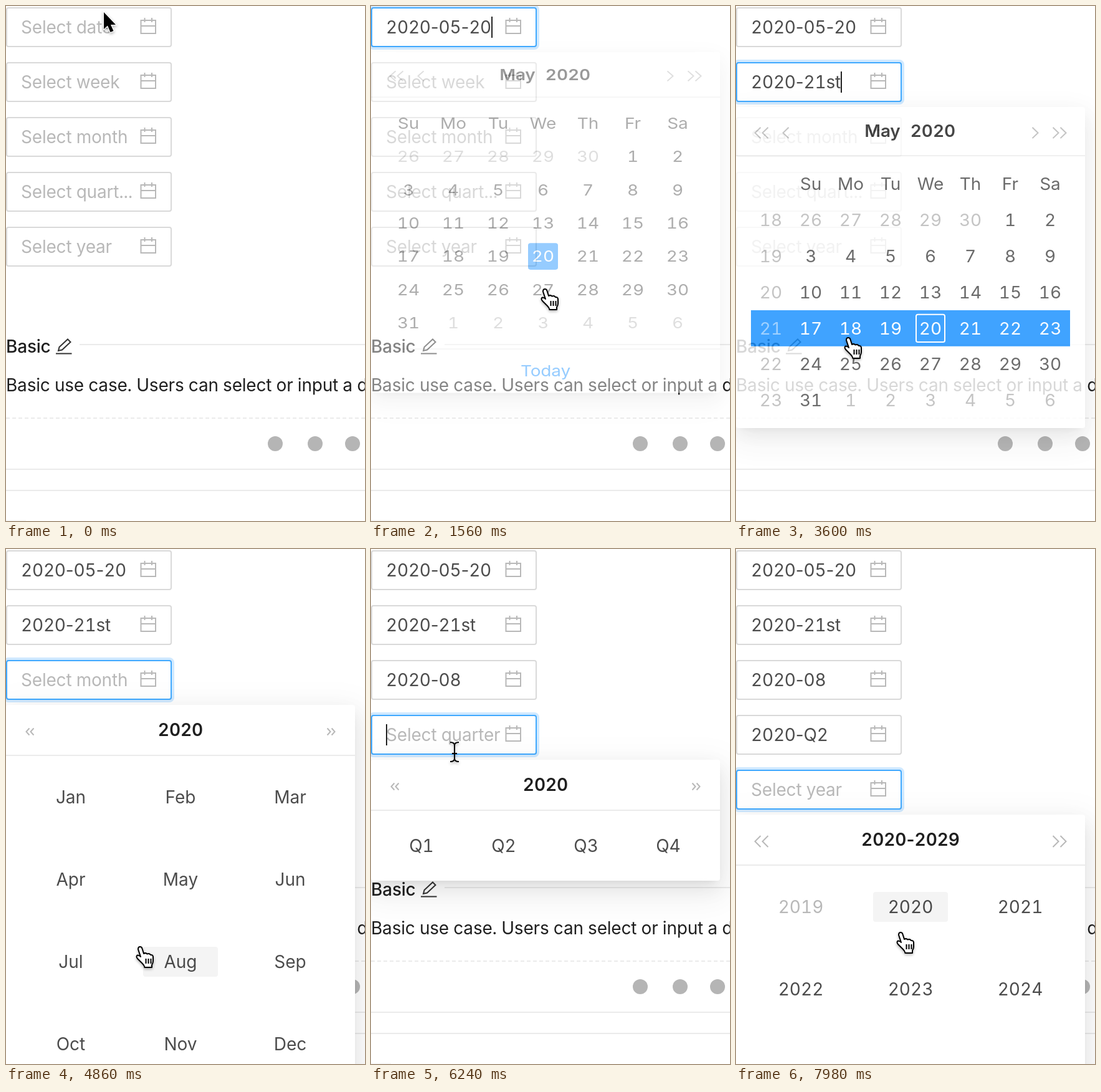
These frames come from a looping animation (576 by 826 pixels, 8000 ms). An HTML page:

```html
<!DOCTYPE html>
<html lang="en">
<head>
<meta charset="utf-8">
<title>Date pickers</title>
<style>
  html, body { margin: 0; width: 100%; height: 100%; overflow: hidden; background: #fff; }
  #stage { position: relative; width: 576px; height: 826px; overflow: hidden; }
  svg { position: absolute; left: 0; top: 0; overflow: visible; }
  text { font: 28px Inter, Roboto, sans-serif; font-feature-settings: "tnum"; fill: #000; fill-opacity: .7; }
  .hyphen { font-feature-settings: normal; }
  .word, .value { letter-spacing: -.2px; }
  .hint { fill-opacity: .28; }
  .dark { fill-opacity: .88; }
  .title { font-weight: 600; fill-opacity: .88; }
  .panel {
    position: absolute; left: 0; width: 560px; background: #fff; border-radius: 4px; transform-origin: 0 0;
    box-shadow: 0 6px 12px -8px rgba(0,0,0,.12), 0 12px 32px rgba(0,0,0,.08), 0 18px 56px 16px rgba(0,0,0,.05);
  }
  .panel text { text-anchor: middle; }
  .line { fill: none; stroke-width: 2; }
</style>
</head>
<body>
<div id="stage"></div>
<script>
const LOOP = 8000, STEP = 60, FADE = 200;
const BLUE = '#1890ff', RULE = '#ebebeb', ICON = '#b8b8b8';
const stage = document.getElementById('stage');

function el(tag, attrs, parent, content) {
  const node = document.createElementNS('http://www.w3.org/2000/svg', tag);
  set(node, attrs);
  if (content !== undefined) node.textContent = content;
  return parent.appendChild(node);
}
function set(node, attrs) {
  for (const key in attrs) node.setAttribute(key, attrs[key]);
}
const layer = (parent, height = 826) => el('svg', { width: 576, height }, parent);
const stroke = (parent, d, color, width = 2) =>
  el('path', { d, class: 'line', stroke: color, 'stroke-width': width }, parent);

// Digits are tabular, hyphens keep their natural width.
function write(text, content) {
  if (text.textContent === content) return;
  text.textContent = '';
  for (const part of content.split(/(-)/)) {
    el('tspan', { class: part === '-' ? 'hyphen' : '' }, text, part);
  }
}
// Text is placed by the middle of its capitals.
function label(parent, x, y, content, cls = '') {
  const text = el('text', { x, y: y + 10, class: cls }, parent);
  write(text, String(content));
  return text;
}
const clamp = v => Math.min(1, Math.max(0, v));

const range = (from, to) => Array.from({ length: to - from + 1 }, (_, i) => from + i);
const days = [...range(26, 30), ...range(1, 31), ...range(1, 6)];
const outsideMonth = i => i < 5 || i > 35;

const pickers = [
  { hint: 'Select date', value: '2020-05-20', open: 420, pick: 1379, chosen: 24, height: 614, arrows: 'both',
    cells: days, muted: outsideMonth, cols: 7, x0: 60, dx: 72, y0: 188, dy: 60, w: 48, today: 24 },
  { hint: 'Select week', value: '2020-21st', open: 2280, pick: 3450, chosen: 3, height: 534, arrows: 'both',
    cells: days, muted: outsideMonth, cols: 7, x0: 120, dx: 64, y0: 188, dy: 60, w: 48, today: 24, weeks: true },
  { hint: 'Select month', value: '2020-08', open: 4300, pick: 5280, chosen: 7, height: 626, arrows: 'small', title: '2020',
    cells: 'Jan Feb Mar Apr May Jun Jul Aug Sep Oct Nov Dec'.split(' '),
    cols: 3, x0: 104, dx: 176, y0: 148, dy: 132, w: 120 },
  { hint: 'Select quart...', focusHint: 'Select quarter', value: '2020-Q2', open: 5920, pick: 6560, chosen: 1,
    height: 194, arrows: 'small', title: '2020', cells: ['Q1', 'Q2', 'Q3', 'Q4'],
    cols: 4, x0: 81, dx: 132, y0: 138, dy: 80, w: 96 },
  { hint: 'Select year', value: '', open: 7260, pick: Infinity, chosen: -1, height: 626, arrows: 'large', title: '2020-2029',
    cells: range(2019, 2030), muted: i => i === 0 || i === 11,
    cols: 3, x0: 104, dx: 176, y0: 148, dy: 132, w: 120 }
];

// Time, tip x, tip y, pointer shape from then on
const path = [
  [0, 157, 10, 'arrow'], [120, 155, 22, 'beam'], [400, 150, 36, 'beam'], [640, 150, 40, 'beam'],
  [800, 175, 120, 'arrow'], [1000, 230, 240, 'hand'], [1260, 280, 455, 'hand'], [1600, 280, 455, 'hand'],
  [1680, 275, 440, 'arrow'], [2100, 160, 130, 'beam'], [2480, 152, 128, 'beam'], [2680, 153, 224, 'arrow'],
  [2700, 153, 228, 'arrow'], [3000, 165, 330, 'hand'], [3330, 181, 533, 'hand'], [3640, 181, 533, 'hand'],
  [3700, 180, 510, 'arrow'], [4150, 150, 212, 'beam'], [4350, 150, 212, 'beam'], [4500, 170, 300, 'arrow'],
  [4620, 185, 400, 'hand'], [4860, 216, 639, 'hand'], [5040, 270, 665, 'hand'], [5460, 270, 668, 'hand'],
  [5500, 265, 650, 'arrow'], [5860, 134, 305, 'beam'], [6140, 134, 305, 'beam'], [6240, 134, 325, 'beam'],
  [6360, 165, 400, 'arrow'], [6540, 213, 478, 'hand'], [6740, 213, 478, 'hand'], [6780, 208, 470, 'arrow'],
  [7140, 140, 388, 'beam'], [7400, 140, 390, 'beam'], [7520, 160, 450, 'arrow'], [7640, 190, 520, 'hand'],
  [7980, 265, 616, 'hand'], [LOOP, 265, 616, 'hand']
];

function buildPage(page) {
  label(page, 0, 546, 'Basic', 'dark word').style.fontWeight = 500;
  stroke(page, 'M84 553l1.5-6L99 534.5l4.5 4.5L90 551.5ZM80 557.5H105.5', '#333');
  stroke(page, 'M118 543H576M0 743H576M0 777H576', RULE);
  label(page, 0, 608, 'Basic use case. Users can select or input a d', 'dark word');
  set(stroke(page, 'M0 661H576', RULE), { 'stroke-dasharray': '6 4' });
  stroke(page, 'M0 825.5H32', '#f6f6f6', 1);
  for (const cx of [432, 496, 556]) el('circle', { cx, cy: 702, r: 12, fill: '#b5b5b5' }, page);
}

function buildInput(page, p, i) {
  const g = el('g', { transform: `translate(0 ${2 + 88 * i})` }, page);
  const frame = (inset, size, attrs) => el('rect', {
    x: inset, y: inset, width: 266 - 2 * inset, height: 64 - 2 * inset, rx: size, fill: 'none', ...attrs }, g);
  p.ring = frame(-2, 6, { stroke: BLUE, 'stroke-width': 4, 'stroke-opacity': .2 });
  frame(1, 3, { stroke: '#d9d9d9', 'stroke-width': 2 });
  p.border = frame(1, 3, { stroke: '#40a9ff', 'stroke-width': 2 });
  p.text = label(g, 24, 32, p.hint);
  p.caret = el('rect', { y: 15, width: 2, height: 34, fill: '#222' }, g);
  stroke(g, 'M216.5 21H240V42H216.5ZM217 30H240M222.5 17V24M234 17V24', ICON);
}

function chevrons(svg, x, y, dir, w, h, count, gap) {
  for (let k = 0; k < count; k++) {
    const left = x + (k - (count - 1) / 2) * gap + dir * w / 2;
    stroke(svg, `M${left} ${y - h}l${-dir * w} ${h}l${dir * w} ${h}`, ICON, 2.6);
  }
}

function buildHeader(svg, p) {
  if (p.title) label(svg, 280, 40, p.title, 'title');
  else {
    label(svg, 235, 40, 'May', 'title word');
    label(svg, 316, 40, '2020', 'title');
  }
  stroke(svg, 'M0 81H560', RULE);
  for (const dir of [1, -1]) {
    const at = d => 280 - dir * d;
    if (p.arrows === 'small') chevrons(svg, at(241.5), 43, dir, 5, 5.5, 2, 7);
    else chevrons(svg, at(239), 43, dir, 9, 9, 2, 12);
    if (p.arrows === 'both') chevrons(svg, at(200), 43, dir, 9, 9, 1, 0);
  }
}

function buildPanel(p, i) {
  p.top = 74 + 88 * i;
  p.panel = document.createElement('div');
  p.panel.className = 'panel';
  p.panel.style.cssText = `top:${p.top}px;height:${p.height}px`;
  stage.append(p.panel);
  const svg = layer(p.panel, p.height);
  buildHeader(svg, p);

  if (p.cols === 7) 'Su Mo Tu We Th Fr Sa'.split(' ').forEach((d, c) => label(svg, p.x0 + c * p.dx, 128, d));
  if (p.weeks) {
    p.rows = range(0, 5).map(r => {
      const y = p.y0 + r * p.dy;
      return {
        box: el('rect', { x: 24, y: y - 30, width: 512, height: 60 }, svg),
        number: label(svg, 56, y, 18 + r, 'hint')
      };
    });
  }
  p.items = p.cells.map((content, n) => {
    const x = p.x0 + n % p.cols * p.dx, y = p.y0 + Math.floor(n / p.cols) * p.dy;
    const box = el('rect', { x: x - p.w / 2, y: y - 24, width: p.w, height: 48, rx: 4, fill: 'none' }, svg);
    if (n === p.today) {
      p.todayBox = el('rect', { x: x - 23, y: y - 23, width: 46, height: 46, rx: 3, class: 'line', stroke: BLUE }, svg);
    }
    const muted = p.muted && p.muted(n);
    return { box, muted, text: label(svg, x, y, content, muted ? 'hint' : '') };
  });
  if (i === 0) {
    stroke(svg, 'M0 535H560', RULE);
    set(label(svg, 280, 574, 'Today', 'word'), { style: `fill:${BLUE};fill-opacity:1` });
  }
}

function paintText(text, white, opacity) {
  text.style.fill = white ? '#fff' : '#000';
  text.style.fillOpacity = opacity;
}

function paintCells(p, hovered, picked) {
  const fill = (on, over) => on ? BLUE : over ? '#f4f4f4' : 'none';
  const hoverRow = Math.floor(hovered / p.cols);
  if (p.weeks) {
    p.rows.forEach((row, r) => {
      const on = picked && r === p.chosen;
      set(row.box, { fill: fill(on, r === hoverRow) });
      paintText(row.number, on, on ? .5 : .28);
    });
  }
  p.items.forEach((item, n) => {
    const on = picked && (p.weeks ? Math.floor(n / 7) : n) === p.chosen;
    if (!p.weeks) set(item.box, { fill: fill(on, n === hovered) });
    paintText(item.text, on, on ? 1 : item.muted ? .28 : .7);
  });
  if (p.todayBox) set(p.todayBox, { stroke: picked ? '#fff' : BLUE, visibility: picked && !p.weeks ? 'hidden' : 'visible' });
}

function cellAt(p, pointer) {
  if (pointer.shape !== 'hand') return -1;
  const c = Math.round((pointer.x - p.x0) / p.dx), r = Math.round((pointer.y - p.top - p.y0) / p.dy);
  return c < 0 || c >= p.cols || r < 0 ? -1 : r * p.cols + c;
}

function pointerAt(t) {
  const k = path.findIndex(key => key[0] > t);
  const [t0, x0, y0, shape] = path[k - 1], [t1, x1, y1] = path[k];
  const f = (t - t0) / (t1 - t0);
  return { x: x0 + (x1 - x0) * f, y: y0 + (y1 - y0) * f, shape };
}

function presence(p, t) {
  if (t < p.open) return 0;
  if (t < p.pick) return 1 - (1 - clamp((t - p.open) / FADE)) ** 5;
  return 1 - clamp((t - p.pick) / FADE) ** 6;
}

function paintInput(p, t, blur) {
  const focused = t >= p.open && t < blur, picked = t >= p.pick;
  const glow = clamp((t - p.open) / 300) * (1 - clamp((t - blur) / 300));
  set(p.ring, { opacity: glow });
  set(p.border, { opacity: glow });
  write(p.text, picked ? p.value : focused && p.focusHint || p.hint);
  set(p.text, { class: picked ? 'value' : 'hint word' });
  const since = t - (picked ? p.pick : p.open);
  set(p.caret, {
    x: 24 + (picked ? p.text.getComputedTextLength() : 0),
    visibility: focused && since % 1000 < 500 ? 'visible' : 'hidden'
  });
}

const page = layer(stage);
buildPage(page);
pickers.forEach((p, i) => { buildInput(page, p, i); buildPanel(p, i); });

const overlay = layer(stage);
overlay.style.filter = 'drop-shadow(0 2px 2px rgba(0,0,0,.3))';
const shapes = { arrow: el('g', {}, overlay), hand: el('g', {}, overlay), beam: el('g', {}, overlay) };
el('path', { d: 'M0 0V27L6 21.5L10.5 32L15.5 30L11 20H19Z', stroke: '#fff', 'stroke-width': 2.5, 'paint-order': 'stroke' }, shapes.arrow);
el('path', {
  d: 'M-4 3Q-4-1-1-1Q2-1 2.5 2L5 10Q8 8 10.5 10.5Q14 9 16 12Q19.5 11.5 20 15V22Q20 25 18 28V32H6.5Q6 29 3 26L-5 18Q-8 14-5 12.5Q-2 12.5 0 15Z',
  fill: '#fff', stroke: '#000', 'stroke-width': 2, 'stroke-linejoin': 'round'
}, shapes.hand);
stroke(shapes.hand, 'M8.5 18V26M12.5 18V26M16.5 18V26', '#000', 1.8);
const beam = 'M-7-15Q0-15 0-10Q0-15 7-15M0-10V11M-7 16Q0 16 0 11Q0 16 7 16M-4 3H4';
stroke(shapes.beam, beam, '#fff', 4);
stroke(shapes.beam, beam, '#000', 2);

function render(t) {
  const pointer = pointerAt(t);
  pickers.forEach((p, i) => {
    paintInput(p, t, i < 4 ? pickers[i + 1].open : Infinity);
    const shown = presence(p, t);
    p.panel.style.display = shown ? '' : 'none';
    p.panel.style.opacity = shown;
    p.panel.style.transform = `scaleY(${.8 + .2 * shown})`;
    if (shown) paintCells(p, cellAt(p, pointer), t >= p.pick);
  });
  for (const name in shapes) {
    set(shapes[name], {
      transform: `translate(${pointer.x} ${pointer.y})`,
      visibility: name === pointer.shape ? 'visible' : 'hidden'
    });
  }
}

const start = performance.now();
function tick() {
  const t = (performance.now() - start) % LOOP;
  render(Math.floor(t / STEP) * STEP);
  requestAnimationFrame(tick);
}
tick();
</script>
</body>
</html>
```
